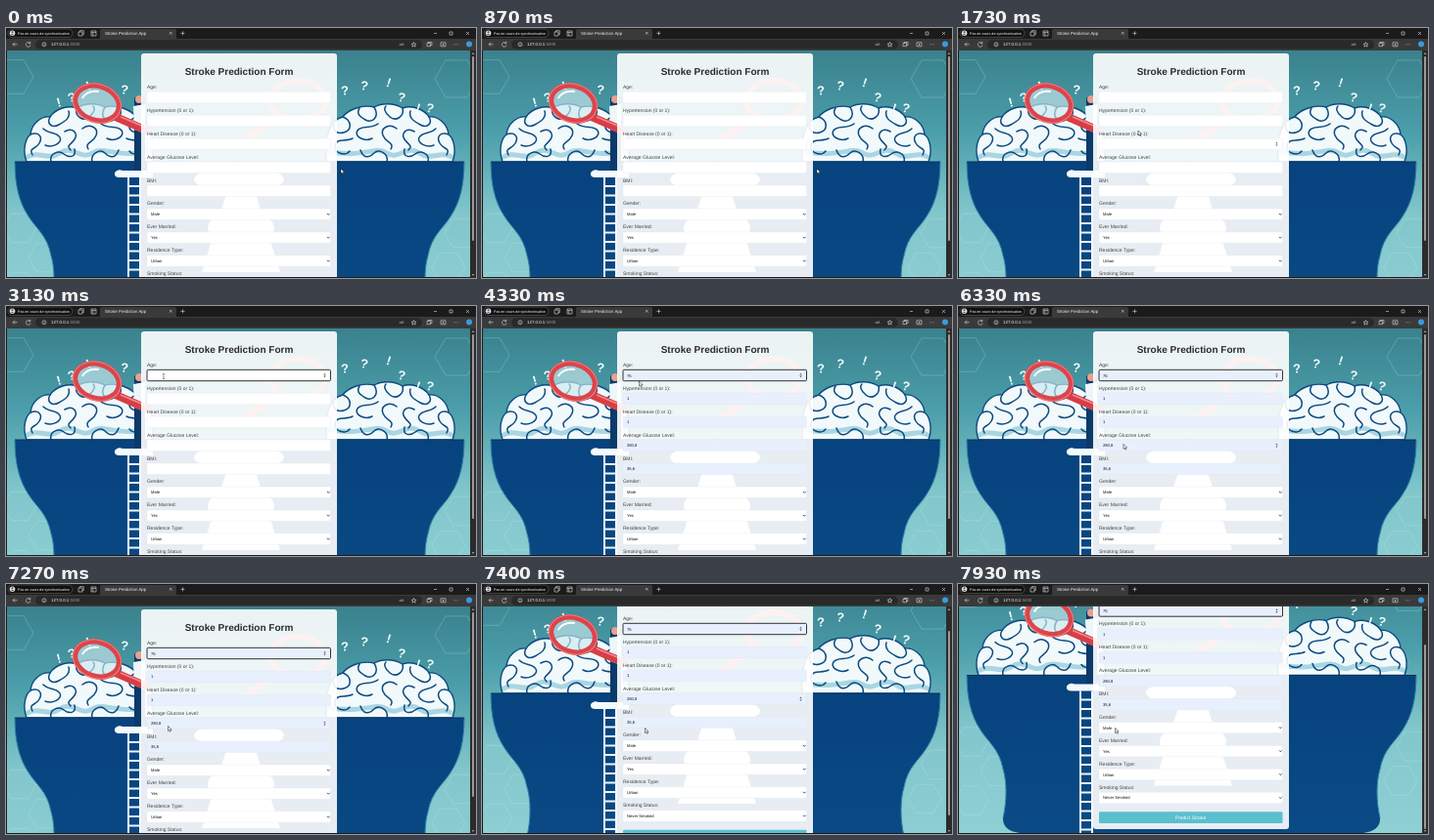
An HTML page for the animation above (8 s loop, 480x256 px).

```html
<!DOCTYPE html>
<html lang="en">
<head>
<meta charset="utf-8">
<title>Stroke Prediction App</title>
<style>
  html, body { margin: 0; width: 100%; height: 100%; overflow: hidden; background: #1b1b1b; }
  svg { display: block; width: 100%; height: 100%; }
  text { font-family: "Liberation Sans", Arial, sans-serif; text-rendering: geometricPrecision; white-space: pre; }
  .ui { fill: none; stroke: #ddd; stroke-width: .6; }
  .label { font-size: 5px; fill: #444; }
  .value { font-size: 4.17px; fill: #111; }
  .mark { font-size: 13px; font-weight: bold; fill: #f2fbfc; text-anchor: middle; }
</style>
</head>
<body>
<svg viewBox="0 0 480 256">
  <defs>
    <linearGradient id="sky" x2="0" y2="1">
      <stop offset="0" stop-color="#39818d"/><stop offset=".3" stop-color="#4b9eaa"/>
      <stop offset=".6" stop-color="#82c6cc"/><stop offset="1" stop-color="#8fd0d4"/>
    </linearGradient>
    <linearGradient id="navy" x2="0" y2="1">
      <stop offset="0" stop-color="#07437e"/><stop offset="1" stop-color="#0a4a85"/>
    </linearGradient>
    <clipPath id="view"><rect x="1" y="23" width="473" height="232"/></clipPath>
    <clipPath id="brainClip"><path id="brainShape" d="M21 137C17 126 19 114 25 109C26 98 36 90 45 91C51 82 64 79 72 82C82 76 94 77 101 81C114 78 128 84 133 91C146 94 152 108 150 137Z"/></clipPath>
    <g id="half">
      <path d="M9 137H240V300H86C70 299 45 301 46 283C50 266 50 246 46 233C42 212 31 206 23 193C13 178 9 160 9 137Z" fill="url(#navy)"/>
      <path d="M9 137C9 160 13 178 23 193C31 206 42 212 46 233C50 246 50 266 46 283" fill="none" stroke="#2c86a6" stroke-width="1"/>
      <use href="#brainShape" fill="#f1f9fb"/>
      <g clip-path="url(#brainClip)" fill="none" stroke-linecap="round">
        <path d="M20 133C34 124 42 137 55 128S76 136 88 128S112 134 150 126" stroke="#a9d6e2" stroke-width="5"/>
        <path id="folds" d="M25 109C33 106 38 111 34 118S23 122 27 130M45 91C41 98 47 103 54 99S66 92 64 85M38 103C44 109 52 106 55 112S47 123 40 120M46 137C44 128 54 125 59 129S72 133 70 124M60 106C68 101 74 108 70 114S61 120 66 125M72 82C70 91 79 96 85 91S91 82 89 80M78 103C85 97 95 102 92 110S80 117 84 124M101 81C95 91 103 98 110 94S119 87 116 82M97 98C105 104 114 99 118 105S111 117 103 113M88 137C86 129 96 123 101 128S112 134 115 125M133 91C123 95 124 105 132 107S144 104 142 99M123 113C130 117 139 112 141 120S130 132 126 126" stroke="#0d4b80" stroke-width="1.5"/>
      </g>
      <use href="#brainShape" fill="none" stroke="#0d4b80" stroke-width="1.4"/>
      <path d="M9 137H240" stroke="#062f60" stroke-width="1"/>
    </g>
  </defs>

  <g clip-path="url(#view)">
    <g id="page">
      <rect y="22" width="480" height="280" fill="url(#sky)"/>
      <g id="hexes" fill="none" stroke="#c9f0f0" stroke-width=".8" opacity=".3"></g>
      <use href="#half"/>
      <use href="#half" transform="matrix(-1 0 0 1 477 0)"/>
      <g id="marks"></g>

      <path d="M131 72Q136 66 142 72V146H131Z" fill="#0b3a69"/>
      <circle cx="136" cy="73" r="4" fill="#e9a08f"/>
      <path d="M130 80L142 78V108L131 104Z" fill="#eef6f8"/>
      <path d="M112 91L146 106" stroke="#d83d46" stroke-width="8"/>
      <path d="M117 91L143 102" stroke="#f28a87" stroke-width="1.5"/>
      <g transform="rotate(18 93 77)">
        <ellipse cx="93" cy="77" rx="23" ry="17.5" fill="#c9e9ee" fill-opacity=".65" stroke="#dc444b" stroke-width="5.5"/>
        <ellipse cx="93" cy="77" rx="25" ry="19.5" fill="none" stroke="#f07f7e" stroke-width="1"/>
        <path d="M77 77Q79 67 91 65" fill="none" stroke="#fff" stroke-width="2"/>
      </g>
      <path d="M111 148Q114 144 119 146H150V153H116Q110 153 111 148Z" fill="#f4fafb"/>
      <path id="ladder" fill="none" stroke="#eef7f9" stroke-width="2"/>
      <g fill="#fff">
        <ellipse cx="238" cy="155" rx="46" ry="13"/><ellipse cx="240" cy="205" rx="34" ry="18"/>
        <path d="M200 250L225 170H255L280 250Z"/>
      </g>
      <ellipse cx="298" cy="74" rx="28" ry="20" fill="none" stroke="#e0767a" stroke-width="6"/>
      <path d="M275 92L240 118" stroke="#e0767a" stroke-width="8"/>

      <rect x="138" y="26" width="200" height="268.5" rx="3" fill="#fff" fill-opacity=".9"/>
      <text x="238" y="48.3" font-size="10" font-weight="bold" fill="#2b2b2b" text-anchor="middle">Stroke Prediction Form</text>
      <g id="fields"></g>
      <rect x="144" y="276.7" width="187.5" height="11.8" rx="1.2" fill="#5bbfce"/>
      <text x="237.5" y="284.4" font-size="5" fill="#fff" text-anchor="middle">Predict Stroke</text>
      <rect id="caret" x="147.3" y="68.5" width=".4" height="5" fill="#111"/>
    </g>
  </g>

  <rect x="474" y="23" width="6" height="233" fill="#2b2b2b"/>
  <path d="M475.6 27L477 25L478.4 27ZM475.6 252L477 254L478.4 252Z" fill="#9b9b9b"/>
  <rect id="thumb" x="476" y="29" width="2" height="189" rx="1" fill="#9b9b9b"/>

  <rect width="480" height="11" fill="#1b1b1b"/>
  <rect y="11" width="480" height="12" fill="#3a3a3a"/>
  <path d="M96 11V3Q96 1 98 1H172Q174 1 174 3V11Z" fill="#3a3a3a"/>
  <rect x="2" y="1" width="66" height="8.6" rx="4.3" fill="#111" stroke="#777" stroke-width=".5"/>
  <circle cx="6.5" cy="5.3" r="2.8" fill="#ddd"/>
  <path d="M4.8 7.2Q6.5 4.6 8.2 7.2Z" fill="#555"/><circle cx="6.5" cy="4.2" r="1" fill="#555"/>
  <text x="12" y="6.6" font-size="3.67" fill="#fff">Pas en cours de synchronisation</text>
  <text x="101" y="7" font-size="4.4" fill="#eee">Stroke Prediction App</text>
  <rect x="30" y="12.3" width="395" height="9.2" rx="4.6" fill="#292929"/>
  <text x="46" y="18.4" font-size="4.4" fill="#fff">127.0.0.1<tspan fill="#999">:5000</tspan></text>
  <g class="ui">
    <path d="M74 4H78V8H74ZM75.5 4V2.7H79.3V6.5H78M87 3H92V8H87ZM87 4.6H92M88.8 4.6V8M167 4L169.6 6.6M169.6 4L167 6.6M178.5 5.4H182.5M180.5 3.4V7.4"/>
    <path d="M437 5.5H440M453 4H456V7H453ZM470 4L473 7M473 4L470 7"/>
    <path d="M11.5 16.7H7M9 14.7L7 16.7L9 18.7M24.5 15.5A2.3 2.3 0 1 0 25 17.4M24.8 13.8V15.7H22.9"/>
    <circle cx="39" cy="16.8" r="2"/><path d="M39 16.4V18M39 15.4V15.8"/>
    <path d="M416.5 14.5L417.2 16.2L419 16.3L417.6 17.5L418.1 19.2L416.5 18.2L414.9 19.2L415.4 17.5L414 16.3L415.8 16.2Z"/>
    <path d="M430 18.7V15.5H433.5V18.7ZM431 15.5V14.5H435V17.5H433.5M444 14.8H449V18.8H444ZM446.5 16V17.8M445.6 16.9H447.4M457.5 16.8H458.2M459.3 16.8H460M461.1 16.8H461.8"/>
  </g>
  <text x="401.5" y="18.2" font-size="4" fill="#ccc">aA</text>
  <circle cx="473" cy="16.6" r="3" fill="#3a9bdc"/>

  <g id="cursor">
    <path id="arrow" d="M0 0V5L1.2 4L2 5.8L2.8 5.4L2.1 3.7H3.6Z" fill="#fff" stroke="#111" stroke-width=".5"/>
    <path id="beam" d="M-.9 -.5H.9M0 -.5V4.5M-.9 4.5H.9" fill="none" stroke="#222" stroke-width=".5"/>
  </g>
</svg>
<script>
const LOOP = 8000, PITCH = 23.93, FOCUS_AT = 2560, FILL_AT = 3950, MAX_SCROLL = 43.5;
const $ = id => document.getElementById(id);
const show = (el, on) => el.setAttribute('visibility', on ? 'visible' : 'hidden');

// label, value, numeric
const FIELDS = [
  ['Age:', '75', 1], ['Hypertension (0 or 1):', '1', 1], ['Heart Disease (0 or 1):', '1', 1],
  ['Average Glucose Level:', '280,8', 1], ['BMI:', '35,6', 1],
  ['Gender:', 'Male'], ['Ever Married:', 'Yes'], ['Residence Type:', 'Urban'], ['Smoking Status:', 'Never Smoked']
];
$('fields').innerHTML = FIELDS.map(([label, value, numeric], i) => `
  <g transform="translate(144 ${71 + i * PITCH})">
    <text class="label" y="-9.2">${label}</text>
    <rect class="box" y="-5.7" width="187.5" height="11.4" rx="1.2" fill="#fff" stroke="#dde2e8" stroke-width=".3"/>
    <text class="value" x="4" y="1.5">${value}</text>
    ${numeric
      ? '<path class="spin" d="M180.4 -.6L181.5 -2.2L182.6 -.6ZM180.4 .6L181.5 2.2L182.6 .6Z" fill="#555"/>'
      : '<path d="M184 -.7L185.3 .7L186.6 -.7" fill="none" stroke="#111" stroke-width=".7"/>'}
  </g>`).join('');
const boxes = document.querySelectorAll('.box');
const values = document.querySelectorAll('.value');
const spins = document.querySelectorAll('.spin');

const MARKS = [
  ['!', 54, 76, -15], ['?', 67, 71, -12], ['!', 84, 59, -20], ['?', 121, 63, 8],
  ['?', 346, 64, -5], ['?', 366, 59, 10], ['!', 391, 56, 18], ['?', 404, 71, 12],
  ['!', 421, 82, 18], ['?', 433, 82, 15]
];
$('marks').innerHTML = MARKS.map(([c, x, y, turn]) =>
  `<text class="mark" transform="translate(${x} ${y}) rotate(${turn})" y="4.5">${c}</text>`).join('');

const hex = (x, y, r) => 'M' + [...Array(6).keys()].map(k =>
  `${x + r * Math.cos(k * Math.PI / 3)} ${y + r * Math.sin(k * Math.PI / 3)}`).join('L') + 'Z';
$('hexes').innerHTML = [[14, 205, 17], [40, 235, 17], [14, 265, 17], [8, 50, 20], [465, 210, 17], [452, 245, 17], [460, 52, 22]]
  .map(h => `<path d="${hex(...h)}"/>`).join('');

let ladder = 'M125 153V300M137 153V300';
for (let y = 162; y < 300; y += 9.5) ladder += `M125 ${y}H137`;
$('ladder').setAttribute('d', ladder);

// time, x, y of the pointer tip
const POINTER = [
  [0, 342, 144], [930, 342, 144], [1730, 184, 105], [2300, 161, 70], [3400, 161, 70],
  [3900, 160, 77], [5220, 162, 77], [5330, 179, 93], [5870, 171, 139], [7000, 165.5, 145.5],
  [7270, 165.5, 145.5], [7400, 166.5, 147.5], [7700, 160.5, 147.5], [LOOP, 160.5, 147.5]
];
const clamp = v => Math.max(0, Math.min(1, v));
const ease = v => { v = clamp(v); return v * v * (3 - 2 * v); };

function pointerAt(t) {
  const i = POINTER.findIndex(k => k[0] > t);
  const [t0, x0, y0] = POINTER[Math.max(0, i - 1)], [t1, x1, y1] = POINTER[i];
  const k = ease((t - t0) / (t1 - t0));
  return [x0 + (x1 - x0) * k, y0 + (y1 - y0) * k];
}
const scrollAt = t => 25 * ease((t - 7290) / 110) + (MAX_SCROLL - 25) * ease((t - 7470) / 140);

function hoveredField(t) {
  const [x, y] = pointerAt(t);
  if (x < 144 || x > 331) return -1;
  const row = (y + scrollAt(t) - 57) / PITCH;
  return row % 1 < .85 ? Math.floor(row) : -1;
}

function draw(t) {
  const scroll = scrollAt(t), focused = t >= FOCUS_AT, filled = t >= FILL_AT;
  const hovered = hoveredField(Math.max(0, t - 110));
  $('page').setAttribute('transform', `translate(0 ${-scroll})`);
  $('thumb').setAttribute('y', 29 + 33 * scroll / MAX_SCROLL);

  spins.forEach((spin, i) => {
    show(spin, i === hovered || (i === 0 && focused));
    show(values[i], filled);
    boxes[i].setAttribute('fill', filled ? '#e8f0fe' : '#fff');
  });
  boxes[0].setAttribute('stroke', focused ? '#1c1c1c' : '#dde2e8');
  boxes[0].setAttribute('stroke-width', focused ? .9 : .3);
  show($('caret'), focused && !filled && (t - FOCUS_AT) % 1000 < 500);

  const [x, y] = pointerAt(t), overAge = hovered === 0 && t < FILL_AT;
  $('cursor').setAttribute('transform', `translate(${x} ${y})`);
  show($('beam'), overAge);
  show($('arrow'), !overAge);
}

function tick() {
  draw(performance.now() % LOOP);
  requestAnimationFrame(tick);
}
tick();
</script>
</body>
</html>
```
